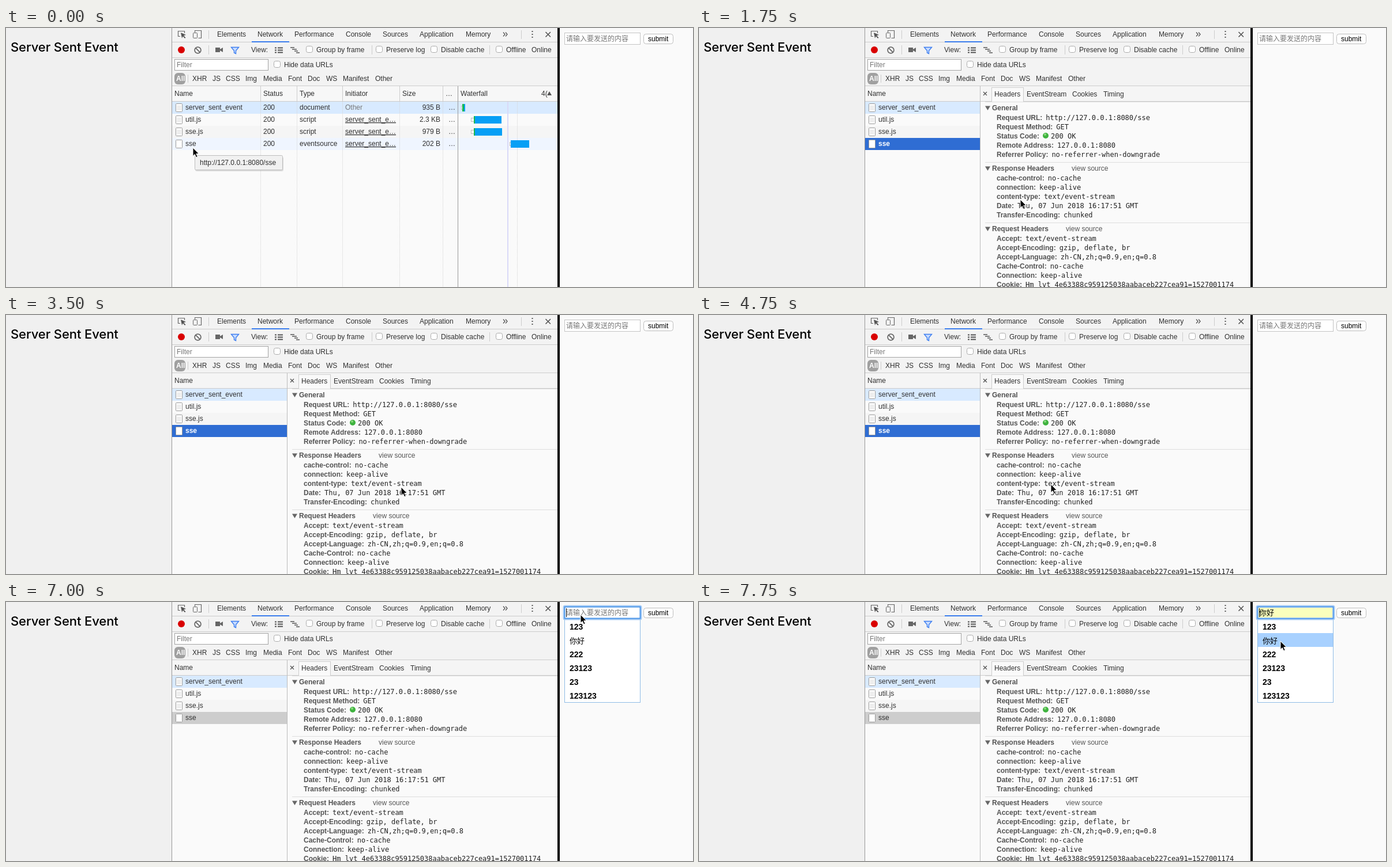
Animation of 1191x450 px, one loop 8000 ms. Source, as an HTML page:

```html
<!DOCTYPE html>
<html lang="en">
<head>
<meta charset="utf-8">
<title>Server Sent Event</title>
<style>
html, body { margin: 0; width: 100%; height: 100%; overflow: hidden; background: #fafafa; }
svg { display: block; width: 1191px; height: 450px; }
text { font: 12px "Liberation Sans", Arial, sans-serif; fill: #303030; white-space: pre; }
.h1 { font: 500 22px Inter, sans-serif; fill: #000; letter-spacing: -.1px; }
.bold, .key { font-weight: bold; }
.key { fill: #545454; }
.mono { font: 12px "DejaVu Sans Mono", monospace; fill: #222; }
.dim { fill: #777; }
.soft { fill: #555; }
.white { fill: #fff; }
.black { fill: #000; }
.end { text-anchor: end; }
.link { text-decoration: underline; }
.cjk { font: 12px "Noto Sans CJK SC", "Noto Sans CJK", sans-serif; }
.item { font-size: 14px; font-weight: bold; fill: #000; }
.word { font: 13px "Noto Sans CJK SC", "Noto Sans CJK", sans-serif; fill: #000; }

.anim { animation: 8s step-end infinite; }
#table { animation-name: table; }
#detail { animation-name: detail; }
#active { animation-name: active; }
#inactive { animation-name: inactive; }
#ring { animation-name: ring; }
#list { animation-name: list; }
#hint { animation-name: hint; }
#first { animation-name: first; }
#second { animation-name: second; }
#pointer { animation-name: move; }

@keyframes table { 0% { visibility: visible } 3.125%, to { visibility: hidden } }
@keyframes detail { 0% { visibility: hidden } 3.125%, to { visibility: visible } }
@keyframes active { 0% { visibility: hidden } 3.125% { visibility: visible } 75%, to { visibility: hidden } }
@keyframes inactive { 0% { visibility: hidden } 75%, to { visibility: visible } }
@keyframes ring { 0% { visibility: hidden } 84.375%, to { visibility: visible } }
@keyframes list { 0% { visibility: hidden } 87.5%, to { visibility: visible } }
@keyframes hint { 0% { visibility: visible } 93.75%, to { visibility: hidden } }
@keyframes first { 0% { visibility: hidden } 93.75% { visibility: visible } 96.875%, to { visibility: hidden } }
@keyframes second { 0% { visibility: hidden } 96.875%, to { visibility: visible } }
@keyframes move {
  0% { transform: translate(324px, 208px) }
  6.25% { transform: translate(325px, 206px) }
  12.5% { transform: translate(380px, 234px) }
  15.625% { transform: translate(468px, 272px) }
  18.75% { transform: translate(538px, 292px) }
  21.875% { transform: translate(557px, 298px) }
  25% { transform: translate(562px, 308px) }
  28.125% { transform: translate(577px, 306px) }
  31.25% { transform: translate(591px, 304px) }
  37.5% { transform: translate(620px, 298px) }
  40.625% { transform: translate(658px, 294px) }
  43.75% { transform: translate(685px, 299px) }
  46.875% { transform: translate(704px, 300px) }
  50% { transform: translate(710px, 298px) }
  53.125% { transform: translate(680px, 298px) }
  56.25% { transform: translate(635px, 296px) }
  59.375% { transform: translate(610px, 294px) }
  65.625% { transform: translate(660px, 290px) }
  68.75% { transform: translate(810px, 272px) }
  71.875% { transform: translate(989px, 249px) }
  75% { transform: translate(1044px, 212px) }
  78.125% { transform: translate(1022px, 84px) }
  81.25% { transform: translate(1004px, 46px) }
  84.375% { transform: translate(997px, 26px) }
  87.5% { transform: translate(996px, 22px) }
  93.75% { transform: translate(1003px, 46px) }
  96.875%, to { transform: translate(1008px, 68px) }
}
</style>
</head>
<body>
<svg id="stage" viewBox="0 0 1191 450"></svg>
<script>
const text = (x, y, s, cls = '') => `<text x="${x}" y="${y}" class="${cls}">${s}</text>`;
const rect = (x, y, w, h, fill, more = '') => `<rect x="${x}" y="${y}" width="${w}" height="${h}" fill="${fill}" ${more}/>`;
const box = (x, y, w, h, fill, stroke, r = 0) =>
  rect(x + .5, y + .5, w - 1, h - 1, fill, `stroke="${stroke}" rx="${r}"`);
const path = (d, fill = 'none', stroke = 'none', w = 1) =>
  `<path d="${d}" fill="${fill}" stroke="${stroke}" stroke-width="${w}"/>`;
const group = (id, s) => `<g id="${id}" class="anim">${s}</g>`;
const check = (x, y) => box(x, y, 12, 12, '#fff', '#aaa', 3);
const row = (list, y) => list.map(([x, s]) => text(x, y, s)).join('');
const rowY = i => 128 + 21 * i;
const dots = (x, y) => `<path d="M${x + .5} ${y}V450" stroke="#d4d4d4" stroke-dasharray="1 1"/>`;

const files = ['server_sent_event', 'util.js', 'sse.js', 'sse'];

function fileIcon(y, lined) {
  const lines = lined ? path(`M296.5 ${y + 7.5}h7m-7 2h7m-7 2h7m-7 2h7`, 'none', '#ddd') : '';
  return box(294, y + 3, 12, 15, '#fff', '#999', 1) + lines;
}

function fileRow(i, w, fill, cls) {
  const y = rowY(i);
  return rect(288, y, w, 21, fill) + fileIcon(y, i < 3) + text(311, y + 14, files[i], cls);
}

function toolbar() {
  const icons =
    path('M309.500 9V5.500H298.500V14.500H302', 'none', '#666', 1.2) +
    path('M303 8l9 4-4 1.300 3.500 3.500-1.500 1.200-3.300-3.600-1.700 3.400z', '#555') +
    path('M327.500 7.500V4.500h11v13h-5', 'none', '#666', 1.2) + box(324, 8, 8, 10, '#f3f3f3', '#666', 1) +
    '<circle cx="304" cy="38" r="6" fill="#d90000"/>' +
    '<circle cx="332.500" cy="38.500" r="5.400" fill="none" stroke="#666" stroke-width="1.700"/>' +
    path('M328.700 34.700l7.600 7.600', 'none', '#666', 1.7) +
    path('M363 34h8v3l5-3v8l-5-3v3h-8z', '#666') +
    path('M390.500 33.500h13l-5 6v5l-3-1.500v-3.500z', '#c9ddff', '#3d7ef0', 1.4) +
    path('M466 34.500h3m2 0h9m-14 4h3m2 0h9m-14 4h3m2 0h9', 'none', '#555', 2) +
    path('M493 34h7m-4 3h8m-4 3h6m-3 3h6', 'none', '#555', 1.7) +
    path('M862 7.500l3 3.500-3 3.500m4-7l3 3.500-3 3.500', 'none', '#555', 1.3) +
    path('M911.500 5h2v2h-2zm0 5h2v2h-2zm0 5h2v2h-2z', '#555') +
    path('M935.500 7l8.500 8.500m0-8.500l-8.500 8.500', 'none', '#555', 1.6);
  const seps = path('M351.500 4v15M893.500 4v15M351.500 30v16M634.500 30v16M838.500 30v16M315.500 81v14', 'none', '#ccc');
  return rect(288, 0, 668, 128, '#f3f3f3') +
    path('M288 24.500h668M288 51.500h668M288 100.500h668', 'none', '#ccc') +
    rect(426, 23, 65, 2, '#3b7ded') + icons + seps +
    row([[366, 'Elements'], [436, 'Network'], [500, 'Performance'], [589, 'Console'],
      [653, 'Sources'], [717, 'Application'], [797, 'Memory']], 15) +
    row([[425, 'View:'], [538, 'Group by frame'], [659, 'Preserve log'],
      [754, 'Disable cache'], [867, 'Offline'], [911, 'Online']], 42) +
    [520, 641, 736, 849].map(x => check(x, 31)).join('') +
    box(292, 54, 163, 20, '#fff', '#a3a3a3') + text(296, 68, 'Filter', 'dim') +
    check(464, 57) + text(482, 68, 'Hide data URLs') +
    rect(292, 78, 19, 20, '#a0a0a0', 'rx="6"') + text(295, 92, 'All', 'white bold') +
    row([[323, 'XHR'], [358, 'JS'], [381, 'CSS'], [415, 'Img'], [446, 'Media'], [489, 'Font'],
      [523, 'Doc'], [555, 'WS'], [584, 'Manifest'], [640, 'Other']], 92);
}

function table() {
  const fills = ['#d8eaff', '#fafafa', '#f5f5f5', '#eff5ff'];
  const data = [['document', 'Other', '935 B'], ['script', '', '2.3 KB'],
    ['script', '', '979 B'], ['eventsource', '', '202 B']];
  const bars = [[791, 5], [812, 47], [812, 48], [875, 32]];
  const cols = [441, 504, 583, 682, 757];
  let s = rect(288, 101, 668, 26, '#f7f7f7') + rect(288, 128, 668, 322, '#fafafa') +
    row([[292, 'Name'], [446, 'Status'], [509, 'Type'], [588, 'Initiator'], [687, 'Size'],
      [762, '…'], [788, 'Waterfall'], [928, '4(']], 118) +
    path('M938 117l4-7 4 7z', '#555');
  data.forEach(([type, from, size], i) => {
    const y = rowY(i), t = y + 14;
    s += fileRow(i, 668, fills[i]) + text(446, t, '200') + text(509, t, type) +
      text(588, t, from || 'server_sent_e…', from ? 'dim' : 'link') +
      text(753, t, size, 'end') + text(767, t, '…');
  });
  s += cols.map(x => dots(x, 128)).join('') + dots(886, 128) + rect(869, 128, 2, 322, '#d9d9f7');
  bars.forEach(([x, w], i) => {
    const y = rowY(i) + 4, wait = i % 3 ? 6 : 2;
    s += box(x - wait, y + 3, wait + 1, 7, '#fff', '#bbb') + rect(x, y, w, 13, '#079ff5');
    if (i < 3) s += rect(x - (i ? 1 : 0), y, i ? 2 : 3, 13, '#16b84e');
  });
  s += cols.map(x => rect(x, 101, 1, 27, '#ccc')).join('') +
    rect(288, 127, 668, 1, '#ccc') + rect(783, 101, 1, 349, '#999');
  return s +
    rect(328, 224, 153, 25, '#000', 'opacity=".12" rx="3"') +
    box(327, 221, 153, 26, '#f1f1f1', '#bdbdbd', 2) + text(336, 238, 'http://127.0.0.1:8080/sse');
}

function section(y, title, rows, source) {
  const link = source ? '<tspan class="soft" font-weight="normal" dx="30" style="font-weight:normal">view source</tspan>' : '';
  return path(`M496 ${y - 7.5}h9l-4.500 7.500z`, '#666') + text(508, y, title + link, 'key') +
    rows.map(([name, value], i) => {
      const dot = value.startsWith('200');
      const ty = y + 17 + 16 * i;
      return text(516, ty, `${name}:<tspan class="mono" style="font-weight:normal" dx="${dot ? 20 : 6}">${value}</tspan>`, 'key') +
        (dot ? `<circle cx="601" cy="${ty - 5}" r="5" fill="#3fb33f"/><circle cx="600" cy="${ty - 7}" r="2" fill="#8ddb80"/>` : '');
    }).join('');
}

function detail() {
  return rect(288, 101, 668, 349, '#fafafa') + rect(288, 101, 668, 26, '#f5f5f5') +
    text(292, 118, 'Name') + rect(288, 127, 668, 1, '#ccc') +
    fileRow(0, 199, '#d8eaff') + fileRow(1, 199, '#fafafa') + fileRow(2, 199, '#f5f5f5') +
    rect(487, 101, 1, 349, '#bbb') +
    path('M493 111l6 6m0-6l-6 6', 'none', '#555', 1.4) +
    box(507, 103, 56, 26, '#fafafa', '#ccc') + rect(508, 127, 54, 2, '#fafafa') +
    row([[512, 'Headers'], [568, 'EventStream'], [647, 'Cookies'], [701, 'Timing']], 119) +
    rect(496, 128, 460, 1, '#ddd') + rect(496, 233, 460, 1, '#ddd') + rect(496, 338, 460, 1, '#ddd') +
    section(143, 'General', [
      ['Request URL', 'http://127.0.0.1:8080/sse'],
      ['Request Method', 'GET'],
      ['Status Code', '200 OK'],
      ['Remote Address', '127.0.0.1:8080'],
      ['Referrer Policy', 'no-referrer-when-downgrade']]) +
    section(248, 'Response Headers', [
      ['cache-control', 'no-cache'],
      ['connection', 'keep-alive'],
      ['content-type', 'text/event-stream'],
      ['Date', 'Thu, 07 Jun 2018 16:17:51 GMT'],
      ['Transfer-Encoding', 'chunked']], true) +
    section(353, 'Request Headers', [
      ['Accept', 'text/event-stream'],
      ['Accept-Encoding', 'gzip, deflate, br'],
      ['Accept-Language', 'zh-CN,zh;q=0.9,en;q=0.8'],
      ['Cache-Control', 'no-cache'],
      ['Connection', 'keep-alive'],
      ['Cookie', 'Hm_lvt_4e63388c959125038aabaceb227cea91=1527001174']], true);
}

function form() {
  const words = ['123', '你好', '222', '23123', '23', '123123'];
  const pick = i => rect(969, 30 + 24 * i, 130, 24, '#a8d1ff') + rect(970, 10, 128, 17, '#faffbd') +
    text(971, 23, words[i], i ? 'word' : 'black');
  const items = words.map((w, i) => text(977, 48 + 24 * i, w, i === 1 ? 'word' : 'item')).join('');
  return rect(960, 0, 231, 450, '#fafafa') + box(968, 8, 132, 21, '#fff', '#c4c4c4') +
    box(1105, 10, 52, 18, '#fff', '#bdbdbd', 4) + text(1113, 23, 'submit', 'black') +
    group('hint', text(971, 23, '请输入要发送的内容', 'cjk dim')) +
    group('list', box(968, 29, 132, 146, '#fff', '#8fbbe6')) +
    group('first', pick(0)) + group('second', pick(1)) +
    group('list', items) +
    group('ring', rect(967, 7, 134, 23, 'none', 'stroke="#a9cdf6" stroke-width="3" rx="2"') +
      rect(968.5, 8.5, 131, 20, 'none', 'stroke="#4f97e8" stroke-width="2"') + rect(971, 11, 1, 15, '#000'));
}

document.getElementById('stage').innerHTML =
  rect(0, 0, 287, 450, '#f0f0f0') + text(8, 41, 'Server Sent Event', 'h1') +
  toolbar() +
  group('table', table()) +
  group('detail', detail()) +
  group('active', fileRow(3, 199, '#2f6dd3', 'white bold')) +
  group('inactive', fileRow(3, 199, '#cdcdcd')) +
  rect(287, 0, 1, 450, '#999') + rect(956, 0, 4, 450, '#000') +
  form() +
  group('pointer', path('M0 0V14.500l3.300-3 2.400 5.300 2.500-1.100-2.400-5.200H10.300z', '#000', '#fff', 1));
</script>
</body>
</html>
```
